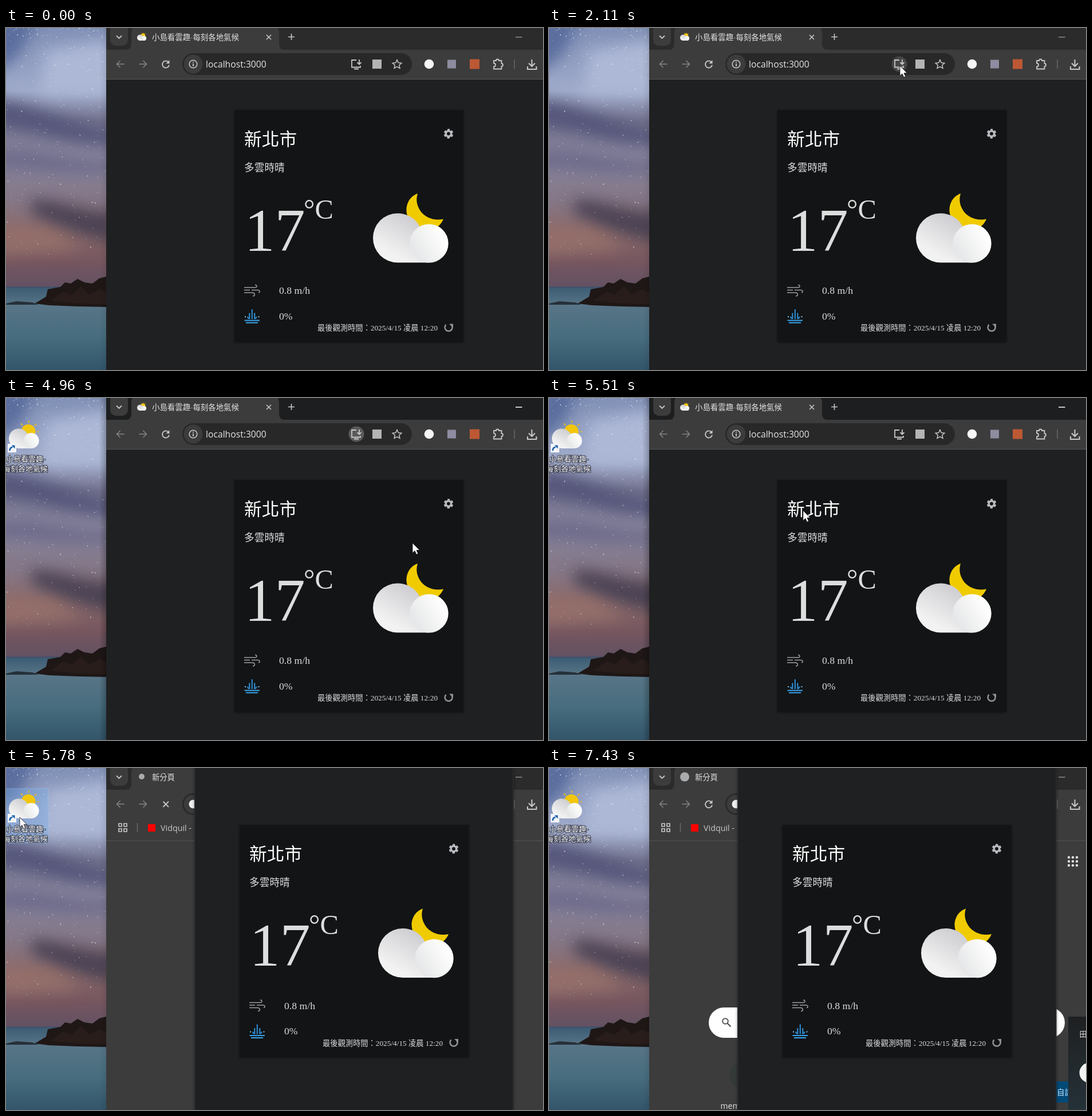
Recreate the animation shown at these times as an HTML page. Size 938 by 597 pixels, loop 8000 ms.

```html
<!DOCTYPE html>
<html lang="zh-Hant">
<head>
<meta charset="utf-8">
<title>Weather app install</title>
<style>
html, body { margin: 0; width: 100%; height: 100%; overflow: hidden; background: #1f2021; }
svg { display: block; width: 100%; height: 100%; }
filter { color-interpolation-filters: sRGB; }
text { font-family: "Open Sans", "Noto Sans CJK TC", "Noto Sans CJK", sans-serif; fill: #e3e3e3; }
.card text { font-family: "Liberation Serif", "Noto Sans CJK TC", "Noto Sans CJK", sans-serif; fill: #dcdddd; }
.thin { font-weight: 300; }
.line { fill: none; stroke: #c7c7c7; stroke-width: 1.8; }
.dim { stroke: #858585; }
</style>
</head>
<body>
<svg viewBox="0 0 938 597">
<defs>
  <linearGradient id="sky" x2="0" y2="1">
    <stop offset="0" stop-color="#8190b6"/><stop offset=".24" stop-color="#a0abcb"/>
    <stop offset=".36" stop-color="#74748f"/><stop offset=".5" stop-color="#89859d"/>
    <stop offset=".66" stop-color="#847787"/><stop offset=".79" stop-color="#8b6a6a"/>
    <stop offset=".9" stop-color="#76565f"/><stop offset="1" stop-color="#625162"/>
  </linearGradient>
  <linearGradient id="sea" x2="0" y2="1">
    <stop offset="0" stop-color="#3b5b73"/><stop offset=".22" stop-color="#587587"/>
    <stop offset=".6" stop-color="#476d7e"/><stop offset="1" stop-color="#33556a"/>
  </linearGradient>
  <linearGradient id="big" x1=".75" y1=".1" x2=".3" y2=".8">
    <stop offset="0" stop-color="#cdcdd1"/><stop offset="1" stop-color="#f2f2f2"/>
  </linearGradient>
  <linearGradient id="small" x1=".1" y1=".7" x2=".8" y2=".3">
    <stop offset="0" stop-color="#e6e7e8"/><stop offset="1" stop-color="#fdfdfd"/>
  </linearGradient>
  <linearGradient id="shade"><stop offset="0" stop-opacity="0"/><stop offset="1" stop-opacity=".4"/></linearGradient>
  <linearGradient id="note" x2="0" y2="1">
    <stop offset="0" stop-color="#1e2022"/><stop offset=".5" stop-color="#22292d"/><stop offset="1" stop-color="#25323a"/>
  </linearGradient>
  <filter id="soft" x="-50%" y="-50%" width="200%" height="200%"><feGaussianBlur stdDeviation="13"/></filter>
  <filter id="drop" x="-10%" y="-10%" width="120%" height="120%"><feDropShadow dx="0" dy="1" stdDeviation="2" flood-opacity=".5"/></filter>
  <clipPath id="photo"><rect width="175" height="597"/></clipPath>

  <g id="cloud">
    <path d="M43 0a43 43 0 0 0 0 86H98V50H86A43 43 0 0 0 43 0" fill="url(#big)"/>
    <circle cx="98" cy="52.5" r="33.7" fill="url(#small)"/>
  </g>
  <g id="app">
    <circle cx="85" cy="12" r="31" fill="#f2c60c"/>
    <circle cx="85" cy="12" r="42" fill="none" stroke="#e8bd1c" stroke-width="11" stroke-dasharray="4.500 28.500" stroke-dashoffset="2"/>
    <use href="#cloud"/>
  </g>

  <g id="card" class="card">
    <rect x="399" y="143" width="400" height="405" fill="#121415" filter="url(#drop)"/>
    <text x="416" y="204.5" font-size="30.7" style="fill:#fff">新北市</text>
    <text x="416" y="249.5" font-size="17.7">多雲時晴</text>
    <text x="416.400" y="388.5" font-size="106.200">17</text>
    <text x="520" y="333" font-size="48.500">°C</text>
    <text x="477" y="464" font-size="17.7">0.8 m/h</text>
    <text x="477" y="508.5" font-size="17.7">0%</text>
    <text x="544" y="528" font-size="13.27">最後觀測時間：2025/4/15 凌晨 12:20</text>
    <path d="M719 289C704 294 696 311 701 327C707 346 735 358 754 347Q761 341 764 333.500C748 337 731 331 723 318C717 308 716 299 719 289" fill="#f0cb00"/>
    <use href="#cloud" x="641" y="323.500"/>
    <g fill="none" stroke="#b9bcc0">
      <circle cx="773" cy="184.500" r="4.700" stroke-width="3.600"/>
      <circle cx="773" cy="184.500" r="7" stroke-width="2.800" stroke-dasharray="4.200 3.130" stroke-dashoffset="2.100" transform="rotate(-90 773 184.500)"/>
      <path d="M768.500 518A6.500 6.500 0 1 0 778.500 519" stroke="#929498" stroke-width="2.500"/>
      <path d="M416 453H435c4 0 4-4.500 0-4.500M416 457.500H426M429 457.500H440c4 0 4 4 1 4.500M416 462H431c5 1 4 6 0 6" stroke="#9d9fa1" stroke-width="1.400"/>
      <path d="M429.800 491V508M425.300 497.500V508M434.300 497.500V508M421.500 504l2.500 3.500M438 504l-2.500 3.500" stroke="#2f93dc" stroke-width="2"/>
      <path d="M416.500 510.500H443M419 514.500H440" stroke="#39a4ee" stroke-width="2"/>
    </g>
    <path d="M774 516.500h7v6.500z" fill="#929498"/>
    <path d="M417 503h2v2h-2zM440.500 503h2v2h-2z" fill="#7fc3f3"/>
  </g>
</defs>

<g clip-path="url(#photo)">
  <rect width="175" height="453" fill="url(#sky)"/>
  <g filter="url(#soft)">
    <path d="M-20 -20H60L20 50L-20 80z" fill="#5a6d9d"/>
    <path d="M70 40L190 20V120L60 115z" fill="#adb8d6"/>
    <path d="M-20 125C50 133 100 165 190 178V205C90 200 50 175-20 170z" fill="#54557a"/>
    <path d="M-20 215C60 205 110 235 190 232V252C90 258 40 245-20 245z" fill="#6c6a8a"/>
    <path d="M45 300C100 302 130 322 190 322V375C120 362 80 338 45 325z" fill="#4a4254"/>
    <path d="M-20 350H80L130 385L-20 395z" fill="#946f6a"/>
  </g>
  <g id="stars" fill="#fff"></g>
  <rect y="452" width="175" height="145" fill="url(#sea)"/>
  <path d="M0 452.500H175" stroke="#40506a" stroke-width="2"/>
  <path d="M0 481l18-4 28 2 10 4H0z" fill="#263039"/>
  <path d="M50 481l20-12 3-13 22-4 8-8 10 2 12-8 12 6 14 2 12-9 12-3V487l-50-1-50-2z" fill="#1e1716"/>
  <path d="M78 476l22-16 14 6 17-15 14 14 18-9 12 6v20l-50-1z" fill="#33251f" opacity=".5"/>
</g>

<g id="shortcut">
  <rect id="glow" x="-2" y="36" width="76" height="95" fill="#78aee8" fill-opacity=".38" stroke="#a9cdf5" stroke-opacity=".4"/>
  <use href="#app" transform="translate(5 53.500) scale(.4)"/>
  <rect x="3" y="80" width="15" height="15" fill="#f4f6f8"/>
  <path d="M6.500 92c0-4 2-6 5-6" fill="none" stroke="#1c5fa8" stroke-width="2.500"/>
  <path d="M9.500 82.500h6v6z" fill="#1c5fa8"/>
  <g font-size="13" text-anchor="middle" style="paint-order:stroke" stroke="#1a1c28" stroke-width="2" stroke-opacity=".75">
    <text x="34.500" y="110.500" style="fill:#fff">小島看雲趣-</text>
    <text x="34" y="127.500" style="fill:#fff">每刻各地氣候</text>
  </g>
</g>

<rect id="edge" x="163" width="12" height="597" fill="url(#shade)"/>
<rect id="strip" x="175" width="763" height="38"/>
<rect x="175" y="38" width="763" height="52" fill="#3c3c3c"/>
<rect x="182" y="-6" width="31" height="37" rx="10" fill="#3c3c3c"/>
<path d="M209 38q10 0 10-10V8Q219-4 231-4H465Q477-4 477 8V28q0 10 10 10z" fill="#3c3c3c"/>
<path d="M193 13.500l4.500 4.500 4.500-4.500" class="line"/>
<path id="dash" d="M890 16H901.500" stroke-width="1.500"/>
<path d="M206.500 63H194M199.500 57l-6 6 6 6M232.500 63H245M239.500 57l6 6-6 6" class="line dim" style="stroke-width:1.500"/>
<rect x="308" y="44" width="401" height="38" rx="19" fill="#282828"/>
<circle cx="327" cy="63" r="16.500" fill="#3c3c3c"/>
<path d="M888 55V71" stroke="#686868" stroke-width="1.500"/>
<path d="M918.500 55V66M913 61.500l5.500 5.500 5.500-5.500M911 67v5h15.500v-5" class="line" style="stroke-width:2.100"/>
<g id="reload"><path d="M284 60A6 6 0 1 0 285 64.500" class="line"/><path d="M285.500 56v6h-6z" fill="#c7c7c7"/></g>

<g id="site">
  <rect x="175" y="90" width="763" height="507" fill="#1f2021"/>
  <path d="M175 89.500H938" stroke="#555"/>
  <use href="#app" transform="translate(229 11.500) scale(.123)"/>
  <text x="255" y="21" font-size="13.430" class="thin">小島看雲趣-每刻各地氣候</text>
  <path d="M455 12l8 8M463 12l-8 8M493 15.500H504M498.500 10V21" class="line" style="stroke-width:1.600"/>
  <circle cx="327" cy="63" r="6.800" class="line" style="stroke-width:1.600"/>
  <path d="M327 62V67M327 58.800V60.500" class="line"/>
  <text x="349" y="68.700" font-size="15.700">localhost:3000</text>
  <g id="hovers"></g>
  <circle id="hot" cx="612" cy="63" r="13.500"/>
  <path d="M612 56H604V68.500H619V66M608 71.500H616M617 55V63M613.500 60l3.500 3.500 3.500-3.500" class="line"/>
  <rect x="640" y="55" width="16" height="16" fill="#b4b4b4"/>
  <path d="M683 55.500l2.300 5.100 5.500.6-4.100 3.700 1.200 5.400-4.900-2.800-4.900 2.800 1.200-5.400-4.100-3.700 5.500-.6z" class="line" style="stroke-width:1.500"/>
  <circle cx="739" cy="63" r="8.300" fill="#f6f6f6"/>
  <rect x="771" y="55.500" width="15" height="15" fill="#8d8ca0"/>
  <rect x="810" y="54.500" width="17" height="17" fill="#bd5834"/>
  <path d="M852 57h4a2.500 2.500 0 0 1 5 0h4.500v5a2.500 2.500 0 0 1 0 5v4.500H852v-4a2.700 2.700 0 0 0 0-6z" class="line"/>
  <use href="#card"/>
</g>

<g id="newTab">
  <rect x="175" y="90" width="763" height="507" fill="#3c3c3c"/>
  <path d="M175 127H938" stroke="#545454"/>
  <circle id="tabDot" cx="237" fill="#a9abad"/>
  <text x="255" y="20.500" font-size="13.300" class="thin">新分頁</text>
  <circle cx="327" cy="63" r="7.500" fill="#f0f0f0"/>
  <path id="stop" d="M274.500 58.500l9.500 9.500M284 58.500l-9.500 9.500" class="line"/>
  <path d="M197 97h5v5h-5zM206 97h5v5h-5zM197 106h5v5h-5zM206 106h5v5h-5z" class="line" style="stroke-width:1.700"/>
  <path d="M229.500 96V112" stroke="#686868" stroke-width="1.500"/>
  <rect x="248" y="98" width="13" height="13" fill="#f00"/>
  <text x="270" y="110" font-size="14.300" style="fill:#c7c7c7">Vidquil -</text>
  <g id="search">
    <rect x="279" y="418" width="622" height="53" rx="26.500" fill="#fff"/>
    <circle cx="308" cy="442" r="4.800" fill="none" stroke="#555" stroke-width="2"/>
    <path d="M311.500 445.500l6 6" stroke="#555" stroke-width="2.300"/>
    <g id="dots" fill="#e3e3e3"></g>
    <rect x="780" y="547" width="180" height="37" rx="8" fill="#004a77"/>
    <text x="887" y="571" font-size="13.500" style="fill:#c2e7ff">自訂頁面</text>
  </g>
  <g id="tiles">
    <circle cx="340" cy="536" r="24.500" fill="#343a38"/>
    <text x="299.500" y="595" font-size="14">memo</text>
  </g>
</g>

<g id="dialog">
  <rect x="350" y="83" width="498" height="200" rx="12" fill="#1f1f1f" stroke="#3d4042" filter="url(#drop)"/>
  <text x="373" y="124.500" font-size="17.700" class="thin">安裝應用程式</text>
  <use href="#app" transform="translate(373.500 164) scale(.245)"/>
  <text x="426" y="164.500" font-size="14.600" class="thin">小島看雲趣-每刻各地氣候</text>
  <text x="426" y="187" font-size="13.500" style="fill:#c7c7c7">localhost:3000</text>
  <rect id="ok" x="675" y="219.500" width="71" height="40.500" rx="20.200"/>
  <text x="696.500" y="244.500" font-size="14.200" class="thin" style="fill:#c2e7ff">安裝</text>
  <rect x="755" y="219.500" width="71.500" height="40.500" rx="20.200" fill="#a8c7fa"/>
  <rect x="752" y="216.300" width="77.500" height="47" rx="23.500" fill="none" stroke="#a8c7fa" stroke-width="2.200"/>
  <text x="776.500" y="244.500" font-size="14.200" class="thin" style="fill:#1d4480">取消</text>
</g>

<rect id="flash" y="-20" height="640" fill="#fff" stroke="#aaa"/>
<g id="win">
  <rect x="329.500" y="-10" width="556.500" height="620" fill="#1f2021" stroke="#333537" filter="url(#drop)"/>
  <use href="#card" x="9" y="-43.500"/>
</g>
<g id="toast">
  <rect x="907" y="434" width="60" height="170" fill="url(#note)"/>
  <text x="926.500" y="468.500" font-size="13">田</text>
  <circle cx="944" cy="532" r="17.500" fill="#f3f3f3"/>
</g>
<path id="cursor" d="M0 0V17.500L4 13.800L6.800 20L9.800 18.700L7.100 12.700H12.500z" fill="#fff" stroke="#111" stroke-width=".8"/>
</svg>

<script>
const $ = id => document.getElementById(id);
const NS = 'http://www.w3.org/2000/svg';
const LOOP = 8000;

const set = (el, attrs) => { for (const k in attrs) el.setAttribute(k, attrs[k]); return el; };
const circle = (parent, cx, cy, r, attrs = {}) =>
  parent.appendChild(set(document.createElementNS(NS, 'circle'), { cx, cy, r, ...attrs }));
const show = (id, on) => { $(id).style.display = on ? '' : 'none'; };
const ramp = (t, a, b) => Math.min(1, Math.max(0, (t - a) / (b - a)));
const smooth = p => p * p * (3 - 2 * p);

let seed = 7;
const rnd = () => (seed = seed * 16807 % 2147483647) / 2147483647;
for (let i = 0; i < 420; i++) {
  const y = 400 * rnd() ** 2.2;
  circle($('stars'), rnd() * 175, y, .3 + .6 * rnd(), { opacity: (.2 + .7 * rnd() ** 2).toFixed(2) });
}
for (let i = 0; i < 9; i++) circle($('dots'), 908 + i % 3 * 7, 156 + Math.floor(i / 3) * 7, 2.2);

const hovers = [[648, 13], [683, 13], [739, 19], [778, 19], [818, 19], [859, 19]]
  .map(([x, r]) => ({ x, r, el: circle($('hovers'), x, 63, r, { fill: '#505050' }) }));

// Pointer keys: time, x, y
const path = [
  [450, 822, 412], [980, 856, 74], [1160, 742, 68], [1970, 613, 66], [3930, 613, 66],
  [4380, 793, 300], [4690, 710, 253], [5430, 710, 253], [5620, 28, 108], [5700, 28, 108],
  [5770, 24, 86], [6670, 24, 86], [6950, -30, 104]
];
function pointer(t) {
  const i = path.findIndex(k => k[0] > t);
  if (i < 1) return path[i < 0 ? path.length - 1 : 0].slice(1);
  const [t0, x0, y0] = path[i - 1], [t1, x1, y1] = path[i];
  const p = smooth(ramp(t, t0, t1));
  return [x0 + (x1 - x0) * p, y0 + (y1 - y0) * p];
}

function draw(t) {
  const [x, y] = pointer(t);
  const active = t >= 3030 && t < 5745;
  const opened = t >= 5745;

  show('cursor', t >= 450 && t < 6950);
  set($('cursor'), { transform: `translate(${x} ${y})` });
  for (const h of hovers)
    h.el.style.opacity = t >= 450 && t < 2100 && Math.abs(x - h.x) < h.r && Math.abs(y - 63) < h.r ? 1 : 0;

  set($('strip'), { fill: active ? '#1d1e1f' : '#2b2b2c' });
  set($('dash'), { stroke: active ? '#fff' : '#8c8c8c' });
  set($('edge'), { opacity: active ? .6 : .2 });
  show('hot', t >= 1900 && t < 5240);
  set($('hot'), { fill: t < 3030 ? '#464646' : '#5a5a5a' });

  const fade = ramp(t, 3480, 3640) * (1 - ramp(t, 4740, 4900));
  show('dialog', fade > 0);
  set($('dialog'), { opacity: fade });
  const onOk = t > 4300 && x > 675 && x < 746 && y > 219 && y < 261;
  set($('ok'), { fill: onOk ? '#1a5c86' : '#004a77' });

  show('shortcut', t >= 4900);
  show('glow', opened && t < 6810);

  show('site', !opened);
  show('newTab', opened);
  show('win', opened);
  show('flash', !opened && t >= 5540);
  const grow = ramp(t, 5540, 5710);
  const half = 278 * (.97 + .03 * grow ** .8);
  set($('flash'), { x: 607.500 - half, width: 2 * half, opacity: Math.min(.95, 1.36 * grow) });

  const loaded = t >= 6470;
  show('search', t >= 6260);
  show('tiles', loaded);
  show('stop', opened && !loaded);
  show('reload', !opened || loaded);
  set($('tabDot'), { cy: loaded ? 15.500 : 15, r: loaded ? 8 : 5 });

  const slide = 1 - (1 - ramp(t, 7020, 7430)) ** 3;
  show('toast', t >= 7020);
  set($('toast'), { transform: `translate(${32 * (1 - slide)} 0)` });
}

const start = performance.now();
function tick() {
  draw((performance.now() - start) % LOOP);
  requestAnimationFrame(tick);
}
tick();
</script>
</body>
</html>
```
